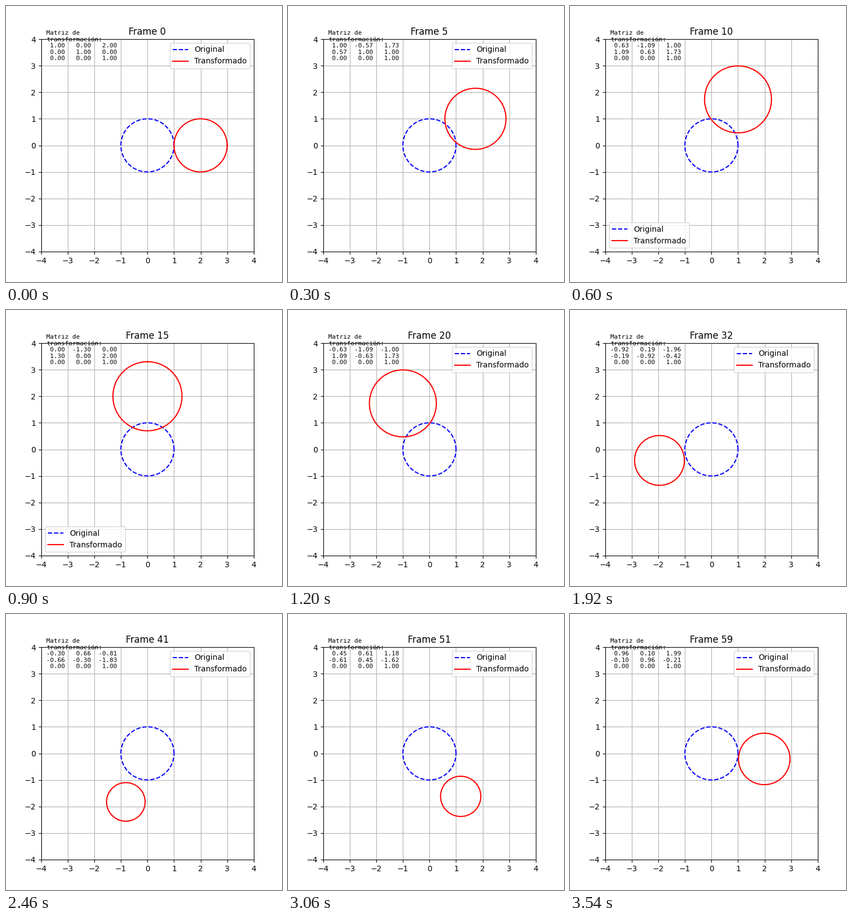
These frames come from a looping animation (500 px wide and 500 px high, 3.6 s). A matplotlib script:

```python
import numpy as np
import matplotlib.pyplot as plt
from matplotlib.animation import FuncAnimation

FRAMES = 60
INTERVAL = 60  # ms

t = np.linspace(0, 2 * np.pi, 100)
circle = np.array([np.cos(t), np.sin(t), np.ones_like(t)])


def transform(theta):
    """Homogeneous matrix: scale, then rotate, then move along an orbit."""
    c, s = np.cos(theta), np.sin(theta)
    k = 1 + 0.3 * s
    move = np.array([[1, 0, 2 * c], [0, 1, 2 * s], [0, 0, 1]])
    rotate = np.array([[c, -s, 0], [s, c, 0], [0, 0, 1]])
    scale = np.diag([k, k, 1])
    return move @ rotate @ scale


def matrix_text(m):
    rows = ["  ".join(f"{v:5.2f}" for v in row) for row in m]
    return "\n".join(["Matriz de", "transformación:"] + rows)


fig, ax = plt.subplots(figsize=(5, 5), dpi=100)
ax.set_xlim(-4, 4)
ax.set_ylim(-4, 4)
ax.set_aspect("equal")
ax.grid(True)
ax.plot(circle[0], circle[1], "b--", label="Original")
moved, = ax.plot([], [], "r-", label="Transformado")
label = ax.text(-3.8, 3.2, "", fontsize=8, family="DejaVu Sans Mono")
title = ax.set_title("")
ax.legend(loc="best")


def update(i):
    m = transform(2 * np.pi * i / FRAMES)
    x, y, _ = m @ circle
    moved.set_data(x, y)
    label.set_text(matrix_text(m))
    title.set_text(f"Frame {i}")
    return moved, label, title


anim = FuncAnimation(fig, update, frames=FRAMES, interval=INTERVAL,
                     repeat=True, repeat_delay=0, blit=False)
plt.show()
```
